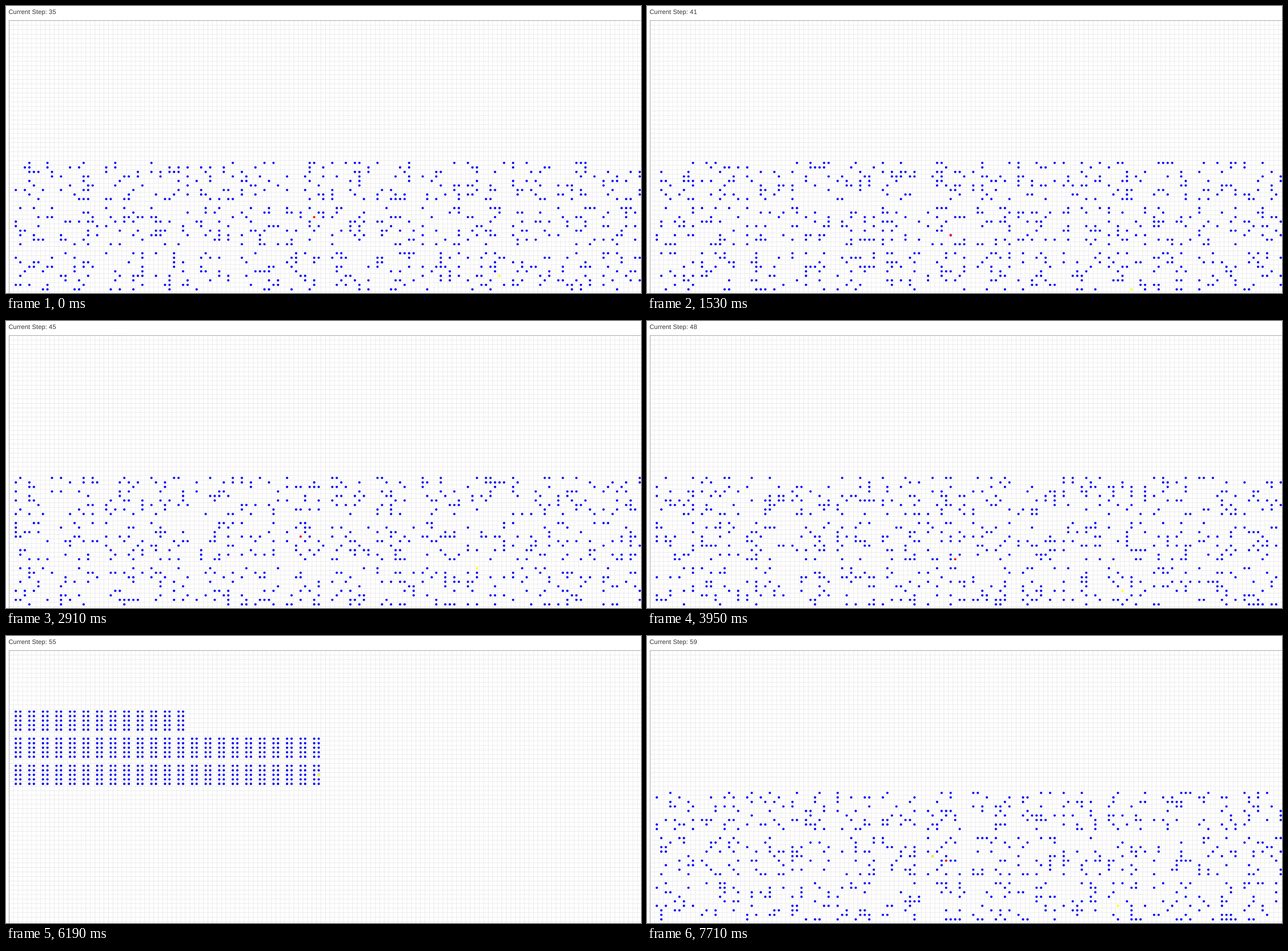
An HTML page that plays this animation: 1112x503 px, repeating every 8 s.

```html
<!DOCTYPE html>
<html lang="en">
<head>
<meta charset="utf-8">
<title>Step simulation</title>
<style>
  html, body { margin: 0; width: 100%; height: 100%; overflow: hidden; background: #fff; }
  svg { display: block; }
  text {
    font: 11.1px "Liberation Sans", Arial, sans-serif;
    letter-spacing: .01em;
    text-rendering: geometricPrecision;
    fill: #333;
  }
  path { fill: none; }
  .dots { stroke-width: 4.2; stroke-linecap: round; }
</style>
</head>
<body>
<svg width="1112" height="503" viewBox="0 0 1112 503">
  <text id="label" x="4.5" y="13.5"></text>
  <path id="grid" stroke="#e6e6e6" stroke-width=".8"/>
  <path d="M5.5 503V25.5H1112" stroke="#555" stroke-dasharray="1 1" shape-rendering="crispEdges"/>
  <path id="people" class="dots" stroke="#00f"/>
  <path id="exposed" class="dots" stroke="#ff0"/>
  <path id="sick" class="dots" stroke="#f00"/>
</svg>
<script>
const LOOP = 8000, TICK = 171.8, LEAD = 22;
const FIRST_STEP = 35, HOME_FROM = 53, HOME_TO = 55, SPREAD_FROM = 59;
const PITCH = 7.917, LEFT = 5.3, TOP = 25.6;
const ROOM = 9, ROOMS_X = 14, ROOMS_Y = 3, ROOM_ROW = 31, PER_ROOM = 20;

const $ = id => document.getElementById(id);
const dot = (col, row) =>
  `M${(LEFT + (col + .5) * PITCH).toFixed(2)} ${(TOP + (row + .5) * PITCH).toFixed(2)}h.01`;

function random(seed) {
  let s = Math.imul(seed, 0x9E3779B1);
  return () => {
    s = s + 0x6D2B79F5 | 0;
    let t = Math.imul(s ^ s >>> 15, 1 | s);
    t ^= t + Math.imul(t ^ t >>> 7, 61 | t);
    return ((t ^ t >>> 14) >>> 0) / 4294967296;
  };
}

// Two columns of five people per house, in three streets.
function home() {
  let people = '';
  [13, 23, 23].forEach((houses, street) => {
    for (let h = 0; h < houses; h++)
      for (let i = 0; i < 10; i++)
        people += dot(1 + h * 3 + i % 2, 13 + street * 6 + (i >> 1));
  });
  return { people, exposed: dot(68, 27), sick: '' };
}

// Everyone takes a random seat in their own room at each step.
function school(step) {
  const next = random(step), pick = () => Math.floor(next() * ROOM);
  const seat = (x, y) =>
    dot(1 + x * (ROOM + 1) + pick(), ROOM_ROW + y * (ROOM + 1) + pick());
  let people = '';
  for (let y = 0; y < ROOMS_Y; y++)
    for (let x = 0; x < ROOMS_X; x++)
      for (let i = 0; i < PER_ROOM; i++) people += seat(x, y);
  const sick = seat(6, 1);
  let exposed = seat(10, 2);
  if (step >= SPREAD_FROM) exposed += seat(6, 1);
  return { people, exposed, sick };
}

// Ticks at which a step begins; the pace drops once everyone is home.
function startTick(step) {
  if (step <= FIRST_STEP) return 0;
  const done = step - FIRST_STEP - 1, atHome = Math.max(0, step - HOME_FROM);
  return Math.floor(1 + 1.79 * (done - atHome) + 2.34 * atHome);
}

function stepAt(ms) {
  const tick = Math.floor((ms + LEAD) / TICK);
  let step = FIRST_STEP;
  while (startTick(step + 1) <= tick) step++;
  return step;
}

function drawGrid() {
  let d = '';
  for (let x = LEFT + PITCH; x < 1112; x += PITCH) d += `M${x.toFixed(2)} 26V503`;
  for (let y = TOP + PITCH; y < 503; y += PITCH) d += `M6 ${y.toFixed(2)}H1112`;
  $('grid').setAttribute('d', d);
}

let shown;
function render(ms) {
  const step = stepAt(ms);
  if (step === shown) return;
  shown = step;
  const scene = step >= HOME_FROM && step <= HOME_TO ? home() : school(step);
  for (const id in scene) $(id).setAttribute('d', scene[id]);
  $('label').textContent = `Current Step: ${step}`;
}

drawGrid();
const start = performance.now();
function frame() {
  render((performance.now() - start) % LOOP);
  requestAnimationFrame(frame);
}
frame();
</script>
</body>
</html>
```
